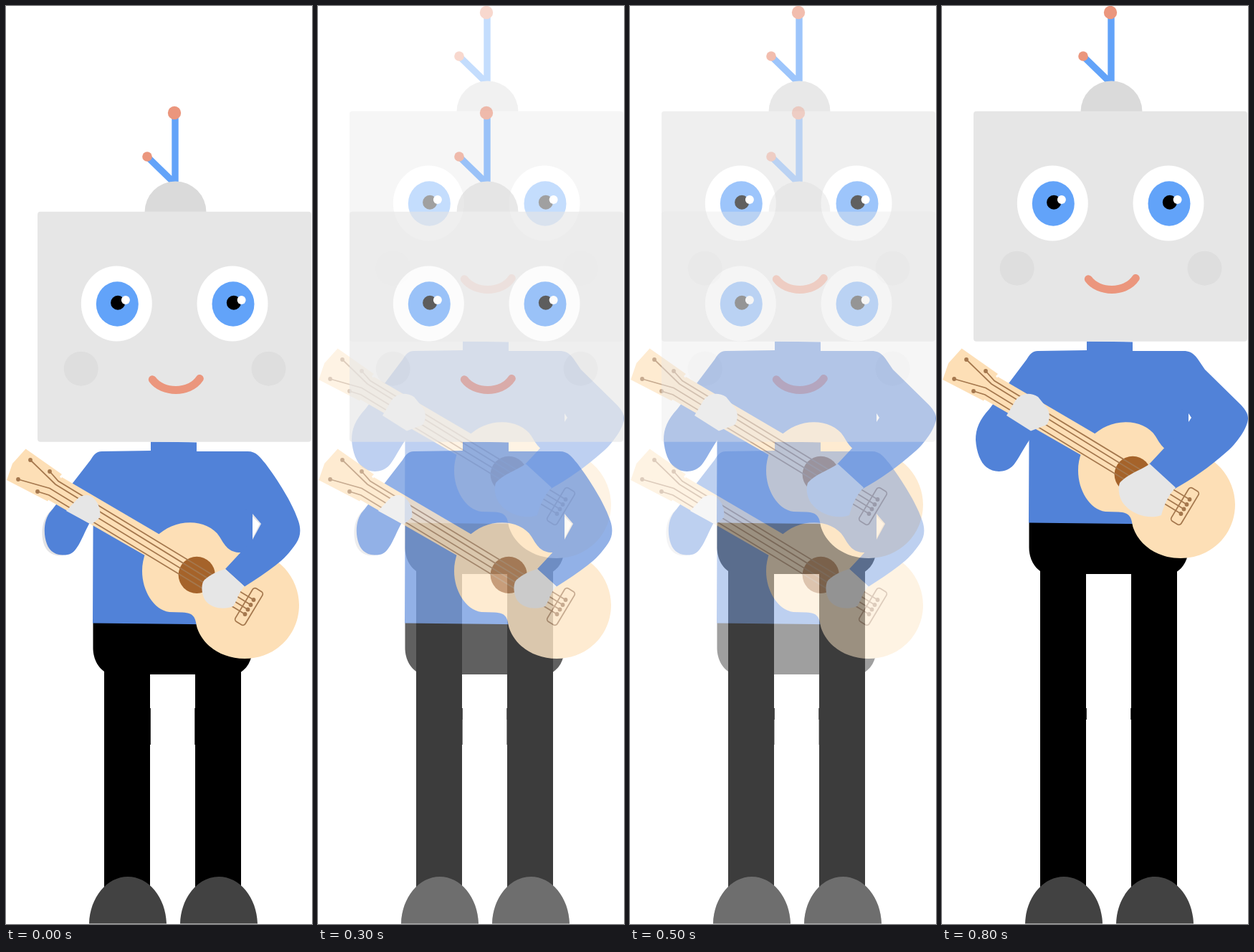
An HTML page that plays this animation: 427x1280 px, repeating every 900 ms.

```html
<!DOCTYPE html>
<html lang="en">
<head>
<meta charset="utf-8">
<title>Robot with guitar</title>
<style>
  html, body { margin: 0; width: 100%; height: 100%; overflow: hidden; background: #fff; }
  svg { display: block; width: 100%; height: 100%; }
</style>
</head>
<body>
<svg viewBox="0 0 427 1280">
  <defs>
    <g id="eye">
      <ellipse cx="-1" cy="-.5" rx="49.5" ry="52.5" fill="#fff"/>
      <ellipse rx="29.5" ry="31.2" fill="#62a3f9"/>
      <circle cx=".8" cy="-1.7" r="10"/>
      <circle cx="11.6" cy="-5.5" r="6" fill="#fff"/>
    </g>

    <g id="head">
      <g stroke="#62a3f9" stroke-width="9.4">
        <path d="M236 150V250M198 211L234 246" fill="none"/>
      </g>
      <g fill="#eb967d">
        <circle cx="235" cy="149" r="9.2"/>
        <circle cx="197" cy="210" r="6.8"/>
      </g>
      <path d="M193.5 287.5a43 43 0 0 1 86 0z" fill="#dadada"/>
      <rect x="44" y="286.7" width="382" height="321" rx="4" fill="#e6e6e6"/>
      <use href="#eye" x="155.3" y="415.5"/>
      <use href="#eye" x="317" y="415.5"/>
      <g fill="#dedede">
        <circle cx="104.7" cy="505.7" r="24"/>
        <circle cx="366.5" cy="505.7" r="24"/>
      </g>
      <path d="M204.3 520.8C218 540 256 541 270.3 519.5" fill="none"
            stroke="#eb967d" stroke-width="11" stroke-linecap="round"/>
    </g>

    <g id="torso">
      <path d="M121.5 855V895C121.5 912 130 926 144 932H322C336 926 344 912 344 895V855Z"/>
      <path d="M202 607.5L266 608.5V621H337L344 630V863L121 860.5L122 629L134 621L202 620Z" fill="#5182d8"/>
    </g>

    <g id="guitar">
      <g fill="#fddfb6">
        <path d="M257 720.3C273 720.3 290 727 298 740C306 753 311 763 330 762C375 756 409 795 409 835
                 C409 877 376 910 333 910C300 910 275 891 267 868C264 858 266 846 246 845.5L228 845
                 C206 842 190 815 190 788C190 750 220 720.3 257 720.3Z"/>
        <path d="M78 657L218 739L199 769L58 688Z"/>
        <path d="M27.5 617.5L78 653L75 656L78 660L61 686L58 690.5L1 661L9 638Z"/>
      </g>
      <circle cx="266.2" cy="793.3" r="25.6" fill="#a5632a"/>
      <g fill="none" stroke="#a5784e" stroke-width="1.8">
        <path d="M61 649L73 662.5L345.5 828M34 633L69 667L341.5 835
                 M17 660L61 672.5L337.5 841.5M44 677L60 682L333.5 848"/>
        <rect x="-8" y="-27" width="16" height="54" rx="4" transform="translate(339 837.5) rotate(31)"/>
      </g>
      <path d="M34 633h0M61 649h0M17 660h0M44 677h0M345.5 828h0M341.5 835h0M337.5 841.5h0M333.5 848h0"
            stroke="#a5784e" stroke-width="5.8" stroke-linecap="round"/>
    </g>

    <g id="legs">
      <path d="M137 900H201V1240H137ZM264 900H328V1240H264Z"/>
      <path d="M137 770H201V910H137ZM264 770H328V910H264Z" class="upper"/>
    </g>

    <path id="feet" fill="#424242"
          d="M116 1279.5C117 1243 141 1214 170 1214S223 1243 224 1279.5Z
             M243 1279.5C244 1243 268 1214 297 1214S350 1243 351 1279.5Z"/>
  </defs>

  <g id="raised"></g>
  <g id="lowered"></g>
</svg>

<script>
const STEP = 100, LOOP = 900, FADE_STEPS = 8;
const BLUE = '#5182d8', GREY = '#e6e6e6';

const path = (d, fill = '#000') => `<path d="${d}" fill="${fill}"/>`;
const legs = (top, kneeTop, kneeEnd) => path(
  `M137 ${top}H201V${kneeTop}H201.8V${kneeEnd}H201V1240H137Z` +
  `M264 ${top}H328V1240H264V${kneeEnd}H263.3V${kneeTop}H264Z`);

const raised = {
  lift: -140,
  legs: legs(770, 979, 995),
  leftArm: path(`M134 481C125 481 122 487 118 493L66 562C52 577 47 590 47 605C48 622 54 637 62 643
    C72 651 88 651 98 642C105 635 110 623 122 605L140 560V481Z`, BLUE),
  rightArm: path(`M330 481H337C352 481 356 491 367 507L417 556C424 564 427 568 427 575
    C427 588 410 611 398 621C372 644 348 660 325 673L289 639L344 580L348 574L344 568L330 560Z`, BLUE),
  hands: path(`M90 571L102 551C108 541 121 537 134 545L147 561C151 568 151 577 146 584L124 592.5Z
    M290 638.5L326 671.5C316 682 310 695 306 710C290 716 268 710 256 697C247 688 245 674 248 665
    C258 653 278 647 290 638.5Z`, GREY)
};

const lowered = {
  lift: 0,
  legs: legs(900, 979, 1030),
  leftArm: path('M64 702C49 716 49 735 52 748C56 763 68 768 80 766Z', '#e2e2e4') +
    path(`M134 621C125 621 122 627 118 633L63 704C52 716 52 737 57 750C62 764 75 767 86 765
      C99 763 104 745 116 722L122 712L140 700V621Z`, BLUE),
  rightArm: path('M344 708L356 722L344 744Z', '#e2e2e4') +
    path('M344 712L354 722L344 742Z', '#fff') +
    path(`M330 621H337C350 621 354 629 362 638C385 669 401 697 408 718C412 730 411 740 405 749
      C396 762 388 771 376 780C363 790 348 800 333 809.5L306 785L344 744L356 722L344 708L330 700Z`, BLUE),
  hands: path(`M84 704L98 689C106 680 117 680 124 688C131 696 132 706 131 713L124 719L119 723Z
    M306 785L332.5 809Q325 818 322 828L317 837C305 842 288 840 280 831C273 824 271 806 277 800
    Q288 790 306 785Z`, GREY)
};

function robot(pose) {
  const part = id => `<use href="#${id}" y="${pose.lift}"/>`;
  return pose.legs + '<use href="#feet"/>' + part('torso') + pose.leftArm +
    part('head') + part('guitar') + pose.rightArm + pose.hands;
}

const raisedLayer = document.getElementById('raised');
const loweredLayer = document.getElementById('lowered');
raisedLayer.innerHTML = robot(raised);
loweredLayer.innerHTML = robot(lowered);

function draw(time) {
  const mix = Math.floor(time % LOOP / STEP) / FADE_STEPS;
  raisedLayer.setAttribute('opacity', mix);
  loweredLayer.setAttribute('opacity', 1 - mix);
}

const start = performance.now();
function tick() {
  draw(performance.now() - start);
  requestAnimationFrame(tick);
}
draw(0);
requestAnimationFrame(tick);
</script>
</body>
</html>
```
